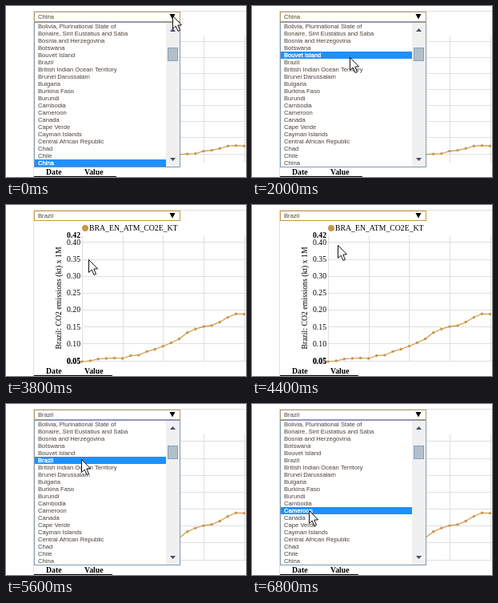
These frames come from a looping animation (300x214 px, 7 s). An HTML page with a canvas:

```html
<!DOCTYPE html>
<html lang="en">
<head>
<meta charset="utf-8">
<title>CO2 emissions by country</title>
<style>
  html, body { margin: 0; width: 300px; height: 214px; overflow: hidden; background: #fff; }
  canvas { display: block; }
</style>
</head>
<body>
<canvas id="stage" width="300" height="214"></canvas>
<script>
const ctx = document.getElementById('stage').getContext('2d');
const LOOP = 7000, STEP = 200;
const SANS = '7.65px "Liberation Sans", Arial, sans-serif';
const SERIF = '9.75px "Liberation Serif", "Times New Roman", serif';
const GOLD = '#cb9643', GRID = '#e0e0e0', INK = '#4a4038';

const countries = ['Bolivia, Plurinational State of', 'Bonaire, Sint Eustatius and Saba',
  'Bosnia and Herzegovina', 'Botswana', 'Bouvet Island', 'Brazil',
  'British Indian Ocean Territory', 'Brunei Darussalam', 'Bulgaria', 'Burkina Faso',
  'Burundi', 'Cambodia', 'Cameroon', 'Canada', 'Cape Verde', 'Cayman Islands',
  'Central African Republic', 'Chad', 'Chile', 'China'];

const charts = {
  China: {
    code: 'CHN', min: 0.43, max: 8.29, tick: 1, first: 1, count: 8, labels: 7, tableEnd: 138,
    values: [.78, .55, .44, .437, .437, .476, .523, .433, .469, .577, .772, .876, .932,
      .969, .988, 1.146, 1.196, 1.31, 1.463, 1.495, 1.467]
  },
  Brazil: {
    code: 'BRA', min: 0.0469, max: 0.4197, tick: 0.05, first: 0.05, count: 8, labels: 8, tableEnd: 133,
    values: [.0469, .0492, .0546, .0564, .0574, .0565, .0646, .066, .0767, .0836, .0925,
      .1025, .1142, .1323, .1432, .1504, .1534, .1638, .1776, .188, .187]
  }
};

// Pointer path: time, x, y
const path = [[0, 208, 12], [1000, 148, 40], [1400, 140, 61], [1600, 140, 61], [2400, 103, 67.5],
  [4200, 103, 67.5], [4400, 107, 50], [4800, 108, 16], [5200, 108, 16], [6000, 79, 122],
  [6400, 77, 129], [6800, 71, 133], [LOOP, 71, 133]];

function pointerAt(t) {
  const i = path.findIndex(key => key[0] > t);
  const [t0, x0, y0] = path[i - 1], [t1, x1, y1] = path[i];
  const k = (t - t0) / (t1 - t0);
  return { x: Math.round(x0 + (x1 - x0) * k), y: Math.round(y0 + (y1 - y0) * k) };
}

function rect(x, y, w, h, fill, stroke) {
  ctx.fillStyle = fill;
  ctx.fillRect(x, y, w, h);
  if (stroke) {
    ctx.strokeStyle = stroke;
    ctx.lineWidth = 1;
    ctx.strokeRect(x + .5, y + .5, w - 1, h - 1);
  }
}

function text(str, x, y, font, color = '#000', align = 'left') {
  ctx.font = font;
  ctx.fillStyle = color;
  ctx.textAlign = align;
  ctx.fillText(str, x, y);
}

function polygon(points, fill, stroke) {
  ctx.beginPath();
  points.forEach(([x, y]) => ctx.lineTo(x, y));
  ctx.closePath();
  ctx.fillStyle = fill;
  ctx.fill();
  if (stroke) {
    ctx.strokeStyle = stroke;
    ctx.lineWidth = 1;
    ctx.stroke();
  }
}

function dot(x, y, r) {
  ctx.beginPath();
  ctx.arc(x, y, r, 0, 7);
  ctx.fillStyle = GOLD;
  ctx.fill();
}

function drawChart(name) {
  const c = charts[name];
  const xAt = i => 95 + 10.13 * i;
  const yAt = v => 196 - (v - c.min) / (c.max - c.min) * 158;
  const axisLabel = (v, y, weight = '') => text(v.toFixed(2), 93, y + 3.3, weight + SERIF, '#000', 'right');

  for (let i = 0; i <= 20; i += 5) rect(Math.round(xAt(i)), 38, 1, 158, GRID);
  for (let i = 0; i < c.count; i++) {
    const v = c.first + i * c.tick;
    rect(95, Math.round(yAt(v)), 205, 1, GRID);
    if (i < c.labels) axisLabel(v, yAt(v));
  }
  axisLabel(c.max, 38, 'bold ');
  axisLabel(c.min, 196, 'bold ');

  ctx.beginPath();
  c.values.forEach((v, i) => ctx.lineTo(xAt(i), yAt(v)));
  ctx.strokeStyle = GOLD;
  ctx.lineWidth = 1.1;
  ctx.stroke();
  c.values.forEach((v, i) => dot(xAt(i), yAt(v), 1.7));

  dot(99, 29, 4);
  text(c.code + '_EN_ATM_CO2E_KT', 104, 32, SERIF);
  ctx.save();
  ctx.translate(69, 116.5);
  ctx.rotate(-Math.PI / 2);
  text(name + ': CO2 emissions (kt) x 1M', 0, 0, SERIF, '#000', 'center');
  ctx.restore();

  text('Date', 50, 211, 'bold ' + SERIF);
  text('Value', 98, 211, 'bold ' + SERIF);
  rect(35, 213, c.tableEnd - 35, 1, '#000');
}

function drawSelect(name, open) {
  rect(35, 7, 183, 13, '#fff', open ? '#b39a72' : GOLD);
  text(name, 40, 16, SANS, INK);
  polygon([[204.5, 10], [211.5, 10], [208, 16.5]], '#000');
}

function drawList(active) {
  rect(35, 20, 183, 182, '#fff', '#8299ad');
  countries.forEach((name, i) => {
    const top = 21 + 9 * i, chosen = i === active;
    if (chosen) rect(36, top, 164, 9, '#1e90ff');
    text(name, 40, top + 7, SANS, chosen ? '#fff' : INK);
    if (chosen) {
      ctx.strokeStyle = '#fff';
      ctx.lineWidth = .35;
      ctx.strokeText(name, 40, top + 7);
    }
  });
  rect(200, 21, 17, 180, '#f0f0f0');
  polygon([[205, 32], [212, 32], [208.5, 28]], '#4a4a68');
  polygon([[205, 190], [212, 190], [208.5, 194]], '#4a4a68');
  rect(202, 52, 13, 17, '#b3bfc9', '#7fa3c4');
}

function drawPointer({ x, y }) {
  const arrow = [[0, 0], [0, 16], [3.7, 12.6], [6.5, 19], [9, 18], [6.3, 11.6], [11, 11.3]];
  polygon(arrow.map(([dx, dy]) => [x + dx + .5, y + dy + .5]), '#fff', '#111');
}

function draw(now) {
  const t = Math.floor(now % LOOP / STEP) * STEP;
  const pointer = pointerAt(t);
  const open = t < 2800 || t >= 5000;
  const selected = t < 2800 ? 'China' : 'Brazil';
  const hovering = pointer.x < 200 && pointer.y >= 21;

  rect(0, 0, 300, 214, '#fff');
  rect(34, 6, 266, 1, GRID);
  rect(34, 6, 1, 208, GRID);
  drawChart(t < 3800 ? 'China' : 'Brazil');
  drawSelect(selected, open);
  if (open) drawList(hovering ? Math.floor((pointer.y - 21) / 9) : countries.indexOf(selected));
  drawPointer(pointer);
}

const start = performance.now();
function tick() {
  draw(performance.now() - start);
  requestAnimationFrame(tick);
}
tick();
</script>
</body>
</html>
```
